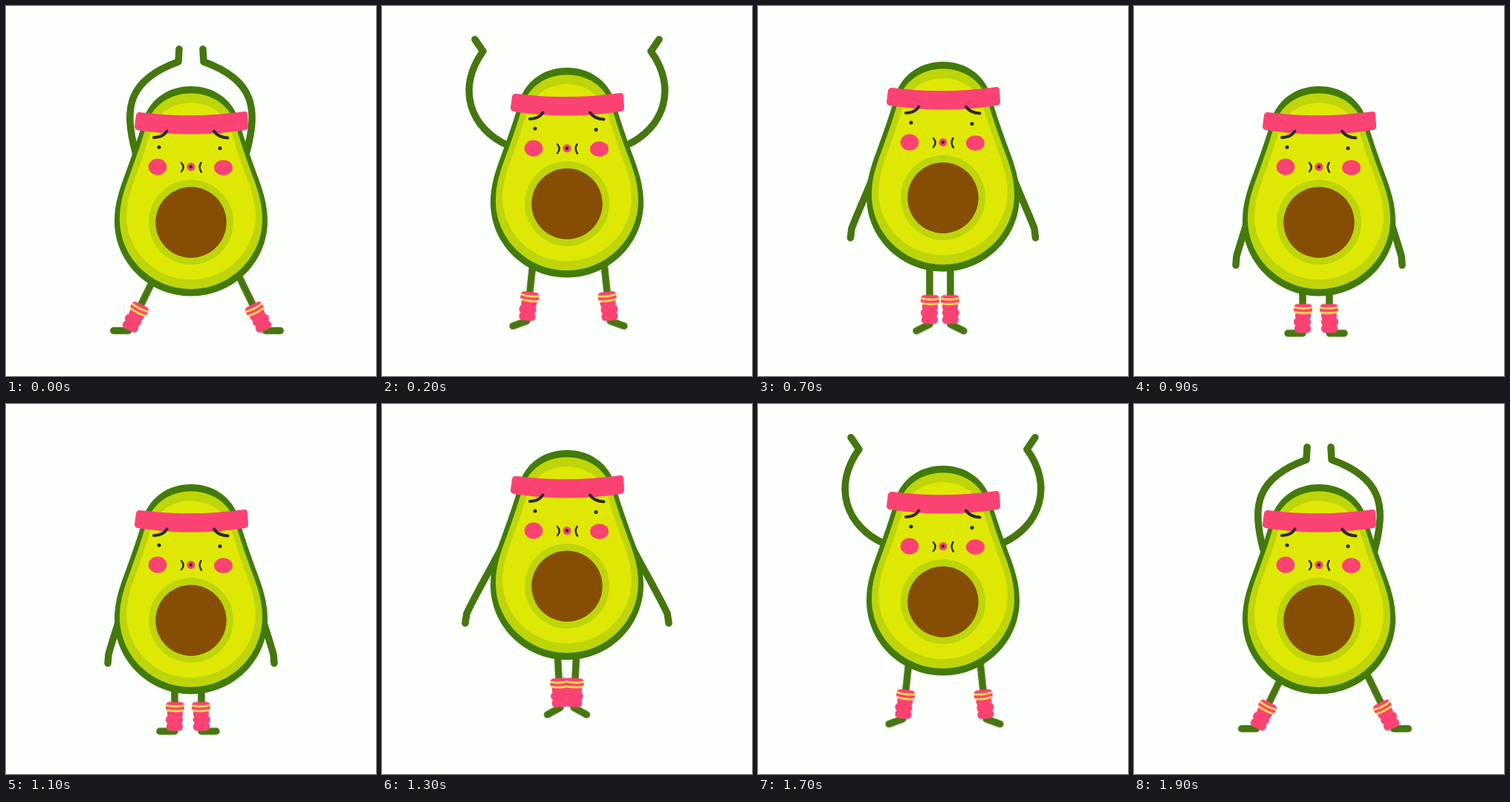
An HTML page without scripts for the animation above (2000 ms loop, 498x498 px).

```html
<!DOCTYPE html>
<html lang="en">
<head>
<meta charset="utf-8">
<title>Avocado jumping jacks</title>
<style>
html, body { margin: 0; width: 100%; height: 100%; overflow: hidden; background: #fdfffd; }
svg { display: block; width: 100vw; height: 100vh; }

.skin { fill: #427b0a; }
.rind { fill: #bdd50a; }
.flesh { fill: #dfe805; }
.pit { fill: #864e05; }
.pink { fill: #fa4373; }
.ink { fill: #2c2a33; }
.line { fill: none; stroke: #2c2a33; stroke-linecap: round; }
.limb { fill: none; stroke: #46760f; stroke-width: 9.5; stroke-linecap: round; stroke-linejoin: round; }
.stripe { fill: none; stroke: #fbe84c; stroke-width: 2.6; }

/* One jump out of the wide stance, then the same jump backwards.
   Motion ticks every 100 ms; the tiny delay keeps ticks off the exact boundary. */
.jump, .sway, .arm, .leg, .foot { animation: 1s steps(2) -1ms infinite alternate; }
.jump { animation-name: jump; }
.sway { animation-name: sway; }
.arm { animation-name: arm; }
.leg { animation-name: leg; }
.foot { animation-name: foot; animation-timing-function: step-end; }

@keyframes jump {
  0% { transform: translateY(0); }
  20% { transform: translateY(-25px); }
  40% { transform: translateY(-49px); }
  60% { transform: translateY(-46px); animation-timing-function: step-end; }
  70% { transform: translateY(-33px); animation-timing-function: step-end; }
  80%, 100% { transform: translateY(0); }
}
@keyframes sway {
  0% { transform: translateX(8px); }
  20% { transform: translateX(2px); }
  40% { transform: translateX(0); }
  60% { transform: translateX(0); animation-timing-function: step-end; }
  70%, 100% { transform: translateX(-4px); }
}
/* shoulder, curve to wrist, hand */
@keyframes arm {
  0% { d: path("M174 196C159 138 163 100 232 75L233 58"); }
  20% { d: path("M170 213C118 190 100 135 136 86L125 70"); }
  40% { d: path("M175 215C140 215 90 214 50 214L34 215"); }
  60% { d: path("M170 222C150 262 128 298 114 328L112 341"); }
  80%, 100% { d: path("M170 225C160 270 144 315 138 337L137 349"); }
}
/* placed at the middle of the leg warmer */
@keyframes leg {
  0% { transform: translate(165.5px, 419px) rotate(26deg); }
  20% { transform: translate(195px, 404px) rotate(6deg); }
  40% { transform: translate(199.5px, 373.5px) rotate(4deg); }
  60% { transform: translate(239px, 388.5px) rotate(-3deg); animation-timing-function: step-end; }
  70% { transform: translate(235px, 408.5px) rotate(0deg); animation-timing-function: step-end; }
  80%, 100% { transform: translate(231px, 420.5px) rotate(0deg); }
}
@keyframes foot {
  0% { transform: rotate(-26deg); }
  80%, 100% { transform: rotate(0deg); }
}
</style>
</head>
<body>
<svg viewBox="0 0 498 498">
  <defs>
    <path id="pear" d="M0-141.5C-31-141.5-54-124-63.500-99C-72-69-80-47-88.500-23.500C-96-3.500-103 16.500-103 40C-103 95.500-57 141 0 141C57 141 103 95.500 103 40C103 16.500 96-3.500 88.500-23.500C80-47 72-69 63.500-99C54-124 31-141.500 0-141.500Z"/>
    <g id="warmer">
      <g class="pink">
        <rect x="-12" y="-19.5" width="25" height="13" rx="5"/>
        <rect x="-10" y="-10" width="21" height="12" rx="5"/>
        <rect x="-12" y="-1" width="23" height="11" rx="5"/>
        <rect x="-11" y="8" width="22" height="11.5" rx="5"/>
      </g>
      <path class="stripe" d="M-12-15Q0-12 13-14.500M-11-8.500Q0-6 12-8"/>
    </g>
  </defs>

  <g class="sway">
    <g class="leg">
      <path class="limb" d="M0 0V-60"/>
      <g transform="translate(0 20)"><path class="limb foot" d="M0 0H-20"/></g>
      <use href="#warmer"/>
    </g>
    <g transform="translate(498) scale(-1 1)">
      <g class="leg">
        <path class="limb" d="M0 0V-60"/>
        <g transform="translate(0 20)"><path class="limb foot" d="M0 0H-20"/></g>
        <use href="#warmer"/>
      </g>
    </g>
  </g>

  <g class="jump">
    <path class="limb arm"/>
    <g transform="translate(498) scale(-1 1)"><path class="limb arm"/></g>

    <g transform="translate(249 249.5)">
      <use href="#pear" class="skin"/>
      <use href="#pear" class="rind" transform="scale(.932)"/>
      <use href="#pear" class="flesh" transform="scale(.842)"/>
    </g>
    <circle class="rind" cx="249" cy="291" r="57"/>
    <circle class="pit" cx="249" cy="291.3" r="47.7"/>

    <path class="pink" d="M180 143Q249 152 321 142q4 0 4 4l1 16q0 4-4 5Q249 178 177 167q-4-1-4-5l2-15q1-4 5-4Z"/>
    <path class="line" stroke-width="4" d="M199 177Q211 177 216.5 168.5M280 168.5Q286 177 298.5 177.5"/>
    <circle class="ink" cx="206" cy="190" r="2.5"/>
    <circle class="ink" cx="288" cy="191.5" r="2.5"/>
    <ellipse class="pink" cx="204" cy="216.5" rx="12.3" ry="11"/>
    <ellipse class="pink" cx="292.5" cy="217.5" rx="12.5" ry="10.3"/>
    <path class="line" stroke-width="2.4" d="M236 211Q241.5 217 236 223M262.5 211Q258.5 217 263 223.5"/>
    <circle class="pink" cx="249" cy="216.5" r="5.5"/>
    <circle class="ink" cx="249" cy="216.5" r="2.2"/>
  </g>
</svg>
</body>
</html>
```
